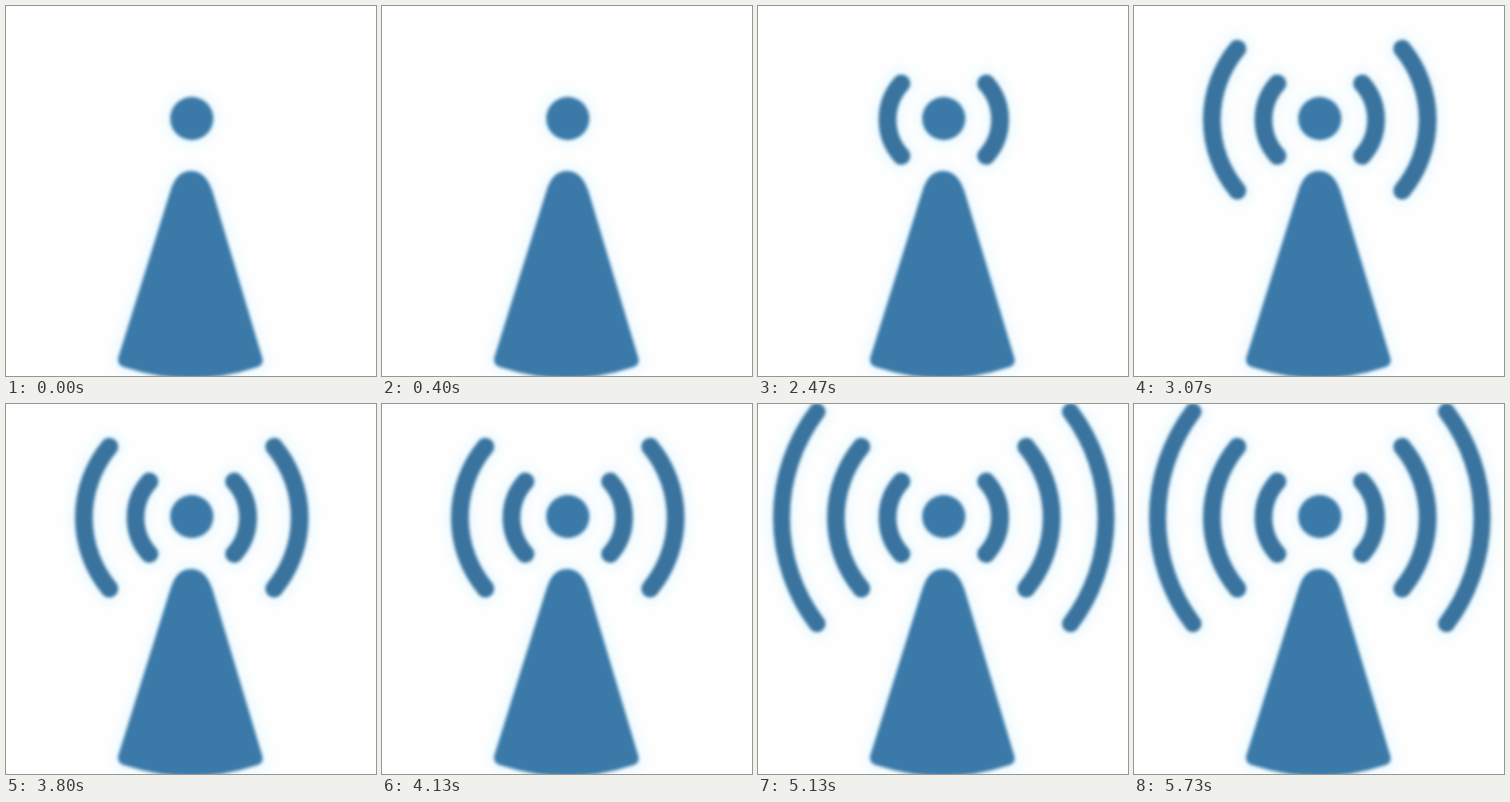
Recreate the animation shown at these times as an HTML page with a canvas. Size 480x480 px, loop 6.14 s.

```html
<!DOCTYPE html>
<html lang="en">
<head>
<meta charset="utf-8">
<title>Transmitter</title>
<style>
  html, body { margin: 0; width: 100%; height: 100%; overflow: hidden; background: #fefefe; }
  canvas { display: block; width: 100vmin; height: 100vmin; }
</style>
</head>
<body>
<canvas id="stage" width="480" height="480"></canvas>
<script>
const ctx = document.getElementById('stage').getContext('2d');
const LOOP = 6140;
const CENTER = { x: 241, y: 147 };
const BODY = '#3a79a8';
const WAVE = '#39739e';
const HALO = '#f0fbff';

// reach: distance to the bow, half: half the chord, depth: bow to chord
const waves = [
  { start: 1530, reach: 73, half: 47, depth: 18, width: 23 },
  { start: 3070, reach: 140, half: 92, depth: 33, width: 23 },
  { start: 4600, reach: 210.5, half: 137.5, depth: 46, width: 22 }
];

function wavePath({ reach, half, depth }) {
  const radius = (half * half + depth * depth) / (2 * depth);
  const angle = Math.asin(half / radius);
  const path = new Path2D();
  for (const side of [-1, 1]) {
    const arc = new Path2D();
    const turn = side < 0 ? Math.PI : 0;
    arc.arc(CENTER.x + side * (reach - radius), CENTER.y + 0.5, radius, turn - angle, turn + angle);
    path.addPath(arc);
  }
  return path;
}

const dot = new Path2D();
dot.arc(CENTER.x, 146, 28, 0, Math.PI * 2);

const cone = new Path2D(
  'M146 455 L213 241 C218 223 227 214 240 214 C253 214 262 223 268 241 ' +
  'L332 455 Q336 466 324 469 Q282 483 240 483 Q198 483 155 469 Q143 466 146 455 Z'
);

function paint(path, color, width, blur, filled) {
  ctx.filter = `blur(${blur}px)`;
  ctx.fillStyle = ctx.strokeStyle = color;
  ctx.lineWidth = width;
  if (filled) ctx.fill(path);
  if (width) ctx.stroke(path);
}

function draw(count) {
  ctx.filter = 'none';
  ctx.fillStyle = '#fefefe';
  ctx.fillRect(0, 0, 480, 480);
  ctx.lineCap = ctx.lineJoin = 'round';

  const active = waves.slice(0, count).map(wave => ({ path: wavePath(wave), width: wave.width }));
  for (const { path, width } of active) paint(path, HALO, width + 18, 5, false);
  for (const shape of [dot, cone]) paint(shape, HALO, 18, 5, true);
  for (const { path, width } of active) paint(path, WAVE, width, 2, false);
  for (const shape of [dot, cone]) paint(shape, BODY, 0, 2, true);
}

let shown = -1;
function frame(now) {
  const time = now % LOOP;
  const count = waves.filter(wave => time >= wave.start).length;
  if (count !== shown) draw(shown = count);
  requestAnimationFrame(frame);
}
frame(0);
</script>
</body>
</html>
```
